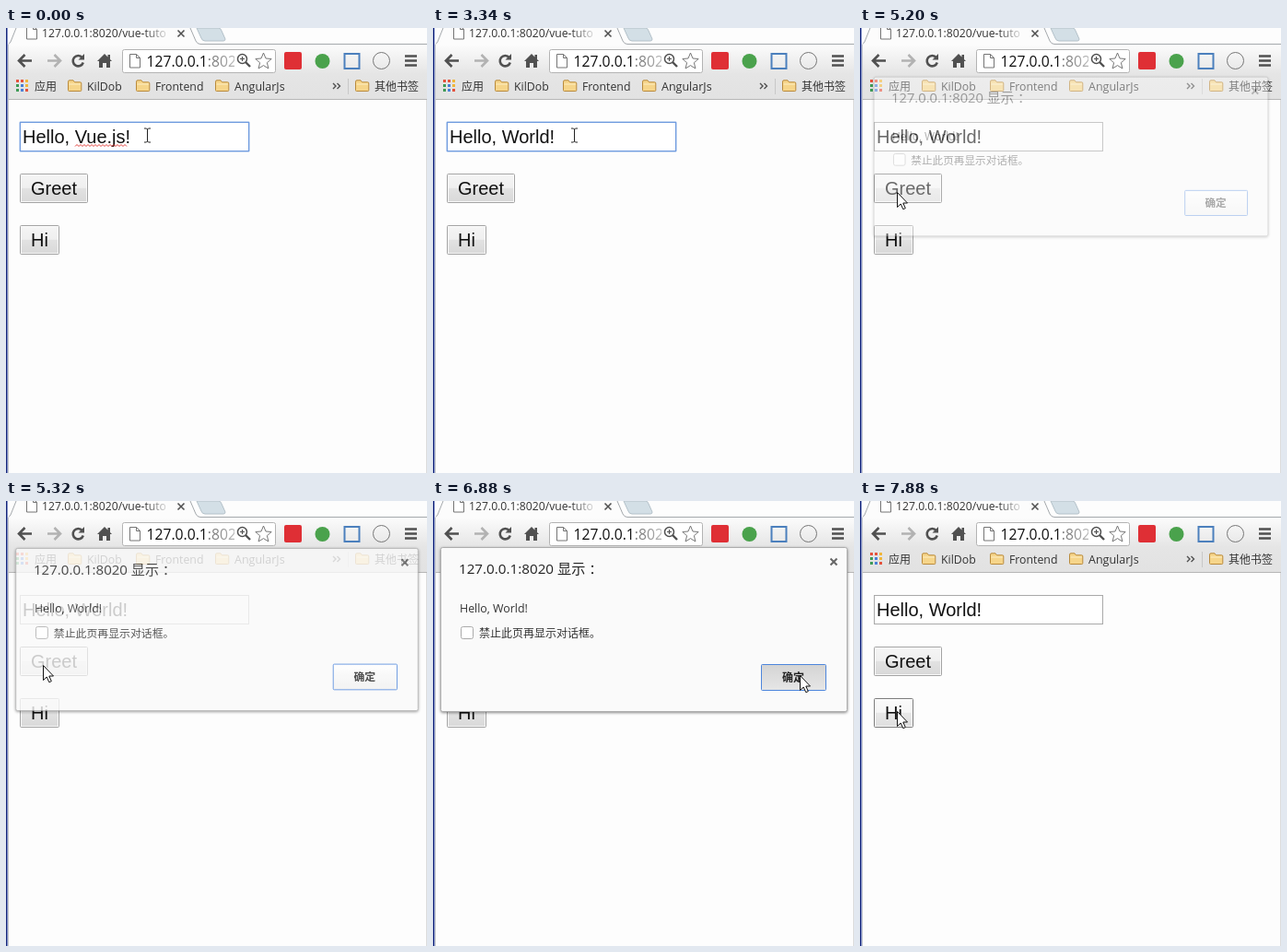
Recreate the animation shown at these times as an HTML page. Size 457 px wide and 483 px high, loop 8000 ms.

```html
<!DOCTYPE html>
<html lang="zh">
<head>
<meta charset="utf-8">
<title>Greeting</title>
<style>
html, body { margin: 0; width: 100%; height: 100%; overflow: hidden; background: #fdfdfd; }
svg { display: block; width: 457px; height: 483px; }
text { font-family: "Open Sans", "Noto Sans CJK SC", "Noto Sans CJK", sans-serif; font-size: 12px; fill: #333; white-space: pre; }
.page text { font-family: "Liberation Sans", Arial, sans-serif; font-size: 20px; fill: #111; font-kerning: normal; }
.line { fill: none; stroke: #505050; stroke-width: 2; }
.thin { fill: none; stroke: #777; }
#dialog .panel { filter: drop-shadow(0 1px 1.5px rgba(0, 0, 0, .45)); }
</style>
</head>
<body>
<svg viewBox="0 0 457 483">
  <defs>
    <linearGradient id="bar" x2="0" y2="1">
      <stop offset=".23" stop-color="#fcfcfc"/><stop offset=".65" stop-color="#e5e5e5"/><stop offset="1" stop-color="#e2e2e2"/>
    </linearGradient>
    <linearGradient id="face" x2="0" y2="1">
      <stop stop-color="#f5f5f5"/><stop offset=".48" stop-color="#efefef"/>
      <stop offset=".5" stop-color="#e2e2e2"/><stop offset="1" stop-color="#d8d8d8"/>
    </linearGradient>
    <linearGradient id="hover" x2="0" y2="1">
      <stop stop-color="#fafafa"/><stop offset=".48" stop-color="#f6f6f6"/>
      <stop offset=".5" stop-color="#e8e8e8"/><stop offset="1" stop-color="#dedede"/>
    </linearGradient>
    <linearGradient id="down" x2="0" y2="1">
      <stop stop-color="#d4d4d4"/><stop offset="1" stop-color="#e6e6e6"/>
    </linearGradient>
    <linearGradient id="okFace" x2="0" y2="1">
      <stop stop-color="#fff"/><stop offset="1" stop-color="#f0f0f0"/>
    </linearGradient>
    <linearGradient id="titleFade" gradientUnits="userSpaceOnUse" x1="150" x2="179" y1="0" y2="0">
      <stop stop-color="#333"/><stop offset="1" stop-color="#333" stop-opacity="0"/>
    </linearGradient>
    <linearGradient id="urlFade" gradientUnits="userSpaceOnUse" x1="228" x2="252" y1="0" y2="0">
      <stop stop-color="#808080"/><stop offset="1" stop-color="#808080" stop-opacity=".45"/>
    </linearGradient>
    <clipPath id="urlClip"><path d="M148 24h100v24h-100z"/></clipPath>
    <g id="folder">
      <path d="M.5 11.5V2.2Q.5.8 2 .8h4l1.6 2h6Q14.8 2.8 14.8 4v7.5q0 1-1 1H1.5q-1 0-1-1z" fill="#f6d58a" stroke="#b98a3c"/>
      <path d="M1.5 5h12.5" stroke="#fdeec4"/>
    </g>
    <g id="sheet">
      <path d="M.5.5h7l4 4v10.5H.5z" fill="#fff" stroke="#757575"/>
      <path d="M7.5.5v4h4" fill="none" stroke="#757575"/>
    </g>
  </defs>

  <rect width="457" height="483" fill="#fdfdfd"/>

  <!-- tab strip and toolbar -->
  <path d="M207 0h24q2 0 3 3l4 9q0 2-2 2h-20q-3 0-4-3z" fill="#d3dfe6" stroke="#b3c0c8"/>
  <path d="M3 17.5L5 15 11 0H200L206 14Q207.500 17.500 211 17.500H457V77H3z" fill="url(#bar)"/>
  <path d="M3 17.500L5 15 11 0M200 0L206 14Q207.500 17.500 211 17.500H457" fill="none" stroke="#a4a8ac"/>
  <path d="M3 77.500H457" stroke="#b6b6b6"/>
  <use href="#sheet" transform="translate(22 -3)"/>
  <text x="39" y="10" style="font-size:12.2px;fill:url(#titleFade)">127.0.0.1:8020/vue-tuto</text>
  <path class="line" d="M186.500 2.500l7 7m0-7l-7 7" style="stroke-width:1.6"/>

  <g class="line" style="stroke-width:2.6">
    <path d="M28 35.500H15M20.500 29l-6.500 6.500 6.500 6.500"/>
    <path d="M45 35.500H58M52.500 29l6.500 6.500-6.500 6.500" stroke="#b2b2b2"/>
    <path d="M82.800 32A5.700 5.700 0 1 0 83.800 37.500"/>
  </g>
  <path d="M85 28v6.500h-6.500z" fill="#505050"/>
  <path d="M99 36l8-8 3.500 3.500V29h2.500v5l2 2h-2v7h-4v-5h-4v5h-4v-7z" fill="#505050"/>
  <rect x="126.500" y="23.500" width="166" height="25" rx="2" fill="#fff" stroke="#b3b3b3"/>
  <use href="#sheet" transform="translate(134 28)"/>
  <g clip-path="url(#urlClip)">
    <text x="152.500" y="41.500" style="font-size:15.7px;fill:#111">127.0.0.1<tspan fill="url(#urlFade)">:8020</tspan></text>
  </g>
  <circle cx="256.500" cy="33.500" r="5" class="line" style="stroke-width:1.5"/>
  <path d="M254 33.500h5m-2.500-2.500v5" class="line" style="stroke-width:1.2"/>
  <path d="M260 37l5 5" class="line" style="stroke-width:2.4"/>
  <path d="M279.500 27l2.500 6 6.200.5-4.800 4.200 1.500 6.300-5.400-3.400-5.400 3.400 1.500-6.300-4.800-4.200 6.200-.5z" class="thin"/>
  <rect x="302" y="26" width="19" height="19" rx="2" fill="#df2f35"/>
  <circle cx="343.500" cy="36" r="8" fill="#4aa24c"/>
  <rect x="367.500" y="28" width="16" height="16" class="line" style="stroke:#4c80bd"/>
  <circle cx="407.500" cy="35.500" r="9" class="thin"/>
  <path d="M433 30.500h13m-13 5h13m-13 5h13" class="line" style="stroke-width:2.6"/>

  <!-- bookmarks -->
  <g id="apps"></g>
  <text x="31" y="67.500">应用</text>
  <use href="#folder" x="67" y="56"/>
  <text x="88" y="67.500" style="font-size:12.3px">KilDob</text>
  <use href="#folder" x="141" y="56"/>
  <text x="162" y="67.500" style="font-size:12.3px">Frontend</text>
  <use href="#folder" x="227" y="56"/>
  <text x="248" y="67.500" style="font-size:12.5px">AngularJs</text>
  <path d="M355 60l3 3-3 3m4.500-6l3 3-3 3" class="line" style="stroke-width:1.4"/>
  <path d="M371.500 55v17" stroke="#c8c8c8"/>
  <use href="#folder" x="379" y="56"/>
  <text x="400" y="67.500">其他书签</text>

  <!-- window edges -->
  <path d="M.5 0v483" stroke="#17277c"/>
  <path d="M1.500 0v483" stroke="#7d8cc4"/>
  <path d="M2.500 18v465" stroke="#c3c6cc"/>
  <path d="M456.500 78v405" stroke="#dcdcdc"/>

  <g class="page">
    <rect id="ring" x="14.500" y="101.500" width="250" height="33" rx="1.5" fill="none" stroke="#6f9bdf" stroke-opacity=".4"/>
    <rect id="field" x="15.500" y="102.500" width="248" height="31" fill="#fff"/>
    <text id="value" x="18" y="125"></text>
    <path id="squiggle" fill="none" stroke="#e2403c"/>
    <rect id="caret" y="107" width="1" height="22" fill="#000"/>
    <g id="greet">
      <rect x="15.500" y="158.500" width="73" height="31" rx="1"/>
      <rect x="16.500" y="159.500" width="71" height="29" fill="none" stroke="#fff" stroke-opacity=".8"/>
      <text x="27" y="181">Greet</text>
    </g>
    <g id="hi">
      <rect x="15.500" y="214.500" width="42" height="31" rx="1"/>
      <rect x="16.500" y="215.500" width="40" height="29" fill="none" stroke="#fff" stroke-opacity=".8"/>
      <text x="27" y="237">Hi</text>
    </g>
  </g>

  <g id="dialog">
    <rect class="panel" x="8.500" y="50.500" width="441" height="178" rx="2" fill="#fafafa" stroke="#adadad"/>
    <text x="28" y="79" style="font-size:15.2px;fill:#222">127.0.0.1:8020 显示 ：</text>
    <path d="M431.500 62.500l7 7m0-7l-7 7" class="line" style="stroke:#666"/>
    <text x="29" y="121" style="font-size:12.4px">Hello, World!</text>
    <rect x="30.500" y="136.500" width="13" height="13" rx="2" fill="#fff" stroke="#aaa"/>
    <text x="50" y="148">禁止此页再显示对话框。</text>
    <rect id="ok" x="356.500" y="177.500" width="70" height="28" rx="1" stroke="#4d86dc"/>
    <text x="391" y="196" text-anchor="middle" style="font-weight:700;fill:#222">确定</text>
  </g>

  <path id="beam" d="M-3.500-7.500h2.500l1 1 1-1H3.500M0-6.500V6.500M-3.500 7.500h2.500l1-1 1 1H3.500" fill="none" stroke="#222"/>
  <path id="arrow" d="M.5.500V16.500L4.200 13l2.600 5.700 2.500-1.100L6.800 12h4.700z" fill="#fff" stroke="#111"/>
</svg>
<script>
const LOOP = 8000;
const $ = id => document.getElementById(id);
const set = (id, attrs) => {
  for (const k in attrs) $(id).setAttribute(k, attrs[k]);
};
const show = (id, on) => { $(id).style.display = on ? '' : 'none'; };

// Each track holds its value until the next time.
const typing = [
  [0, 'Vue.js!'], [280, 'Vue.js'], [400, 'Vue.j'], [520, 'Vue.'], [640, 'Vue'], [760, 'Vu'],
  [1040, ''], [1600, 'W'], [1880, 'Wo'], [2030, 'Wor'], [2280, 'Worl'], [2560, 'World'], [2810, 'World!']
];
const caretOn = [[0, false], [280, true], [3340, false], [3860, true], [4340, false], [4900, true], [5050, false]];
const pointer = [
  [0, [153, 117]], [3620, [146, 130]], [3740, [122, 165]], [3860, [96, 198]], [3980, [74, 208]],
  [4100, [54, 200]], [4220, [44, 186]], [4340, [40, 178]],
  [5440, [150, 192]], [5560, [320, 212]], [5680, [416, 206]], [5830, [408, 200]], [5950, [401, 193]],
  [6070, [398, 189]], [7340, [397, 189]], [7490, [300, 214]], [7610, [160, 235]], [7730, [66, 228]], [7880, [40, 228]]
];
// [opacity, scale]
const popup = [[0, [0, 1]], [5200, [.38, .97]], [5320, [.8, .99]], [5440, [1, 1]], [7190, [0, 1]]];

const at = (track, t) => track.reduce((v, [time, next]) => time <= t ? next : v, track[0][1]);

const dots = ['#e5533d', '#e5533d', '#f0b73c', '#3f9b57', '#4a80d8', '#f0b73c', '#3f9b57', '#4a80d8', '#e5533d'];
$('apps').innerHTML = dots.map((c, i) =>
  `<rect x="${11 + i % 3 * 5}" y="${56 + Math.floor(i / 3) * 5}" width="3" height="3" fill="${c}"/>`).join('');

let wave = 'M75 128.5';
for (let x = 77, up = true; x <= 131; x += 2, up = !up) wave += `L${x} ${up ? 126.5 : 128.5}`;
set('squiggle', { d: wave });

function paintButton(id, hover, pressed) {
  const face = $(id).firstElementChild;
  face.setAttribute('fill', `url(#${pressed ? 'down' : hover ? 'hover' : 'face'})`);
  face.setAttribute('stroke', hover ? '#7c7c7c' : '#a3a3a3');
}

function draw(t) {
  const value = $('value');
  const text = 'Hello, ' + at(typing, t);
  if (value.textContent !== text) value.textContent = text;
  set('caret', { x: Math.round(18 + value.getComputedTextLength()) });
  show('caret', at(caretOn, t));
  show('squiggle', t < 280);
  const focused = t < 5050;
  show('ring', focused);
  set('field', { stroke: focused ? '#6f9bdf' : '#a9a9a9' });

  const [x, y] = at(pointer, t);
  const inField = x > 15 && x < 264 && y > 102 && y < 134;
  show('beam', inField);
  show('arrow', !inField);
  set('beam', { transform: `translate(${x + .5} ${y - .5})` });
  set('arrow', { transform: `translate(${x} ${y})` });

  const [alpha, scale] = at(popup, t);
  const over = (right, top) => alpha < 1 && x > 15 && x < right && y > top && y < top + 32;
  paintButton('greet', over(89, 158), t >= 5050 && t < 5200);
  paintButton('hi', over(58, 214), false);
  show('dialog', alpha);
  set('dialog', { opacity: alpha, transform: `translate(229 139) scale(${scale}) translate(-229 -139)` });
  set('ok', { fill: t >= 6880 ? 'url(#down)' : 'url(#okFace)' });
}

const start = performance.now();
function tick() {
  draw((performance.now() - start) % LOOP);
  requestAnimationFrame(tick);
}
tick();
</script>
</body>
</html>
```
